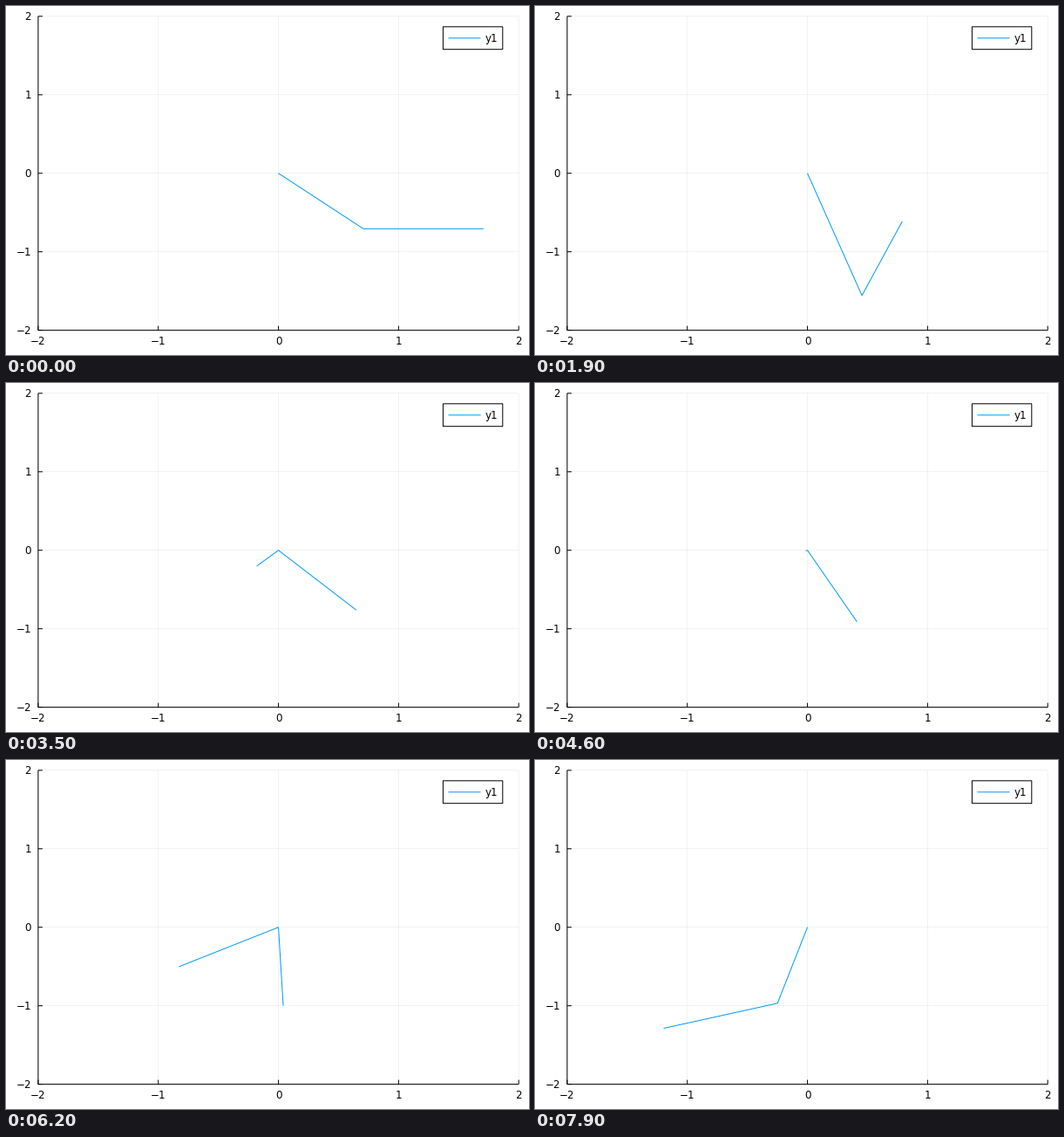
A matplotlib script that plays this animation: 600x400 px, repeating every 8000 ms.

```python
import numpy as np
import matplotlib.pyplot as plt
from matplotlib.animation import FuncAnimation
from matplotlib.patches import Rectangle

W, H, DPI = 600, 400, 100
FRAMES, STEP = 80, 100
BLUE = "#009AFA"
PT = 72 / DPI
LEFT, RIGHT, TOP, BOTTOM = 36.9, 588.19, 11.81, 371.61

# Key poses of the two arms, as angles from the downward vertical
TIMES = np.array([0, 0.7, 1.9, 2.7, 3.5, 4.6, 5.4, 6.2, 7.9])
UPPER = [np.pi / 4, 0.877, 0.908, 0.841, 0.705, 0.425, 0.217, 0.04, -0.252]
LOWER = [np.pi / 2, 0.869, -0.341, -1.225, -2.165, -2.7, -2.415, -2.091, -1.246]


def smooth(keys, t):
    """Cubic Hermite curve through the key angles."""
    keys = np.asarray(keys)
    slope = np.gradient(keys, TIMES, edge_order=2)
    i = np.clip(np.searchsorted(TIMES, t, side="right") - 1, 0, len(TIMES) - 2)
    h = TIMES[i + 1] - TIMES[i]
    s = (t - TIMES[i]) / h
    ease = s * s * (3 - 2 * s)
    return (keys[i] + (keys[i + 1] - keys[i]) * ease
            + h * s * (1 - s) * (slope[i] * (1 - s) - slope[i + 1] * s))


def to_px(x, y):
    return (LEFT + (x + 2) * (RIGHT - LEFT) / 4,
            TOP + (2 - y) * (BOTTOM - TOP) / 4)


def arm(t):
    """Pivot, joint and tip, joined in order of x."""
    th = np.array([smooth(UPPER, t), smooth(LOWER, t)])
    x = np.append(0, np.cumsum(np.sin(th)))
    y = np.append(0, -np.cumsum(np.cos(th)))
    order = np.argsort(x, kind="stable")
    return to_px(x[order], y[order])


fig = plt.figure(figsize=(W / DPI, H / DPI), dpi=DPI, facecolor="white")
ax = fig.add_axes([0, 0, 1, 1])
ax.set_xlim(0, W)
ax.set_ylim(H, 0)
ax.axis("off")


def stroke(xs, ys, color="black", width=1, z=2, **kw):
    return ax.plot(xs, ys, color=color, lw=width * PT, zorder=z, snap=False,
                   solid_capstyle="butt", solid_joinstyle="round", **kw)[0]


def label(x, y, text, ha):
    ax.text(x, y, text, ha=ha, va="baseline", fontsize=11.85 * PT,
            family="DejaVu Sans", color="black", zorder=5)


for v in range(-2, 3):
    x, y = to_px(v, v)
    text = str(v).replace("-", "\u2212")
    stroke([x, x], [TOP, BOTTOM], width=0.5, alpha=0.1, z=1)
    stroke([LEFT, RIGHT], [y, y], width=0.5, alpha=0.1, z=1)
    stroke([x, x], [BOTTOM, BOTTOM - 5])
    stroke([LEFT, LEFT + 5], [y, y])
    label(x, 387.7, text, "center")
    label(28.9, y + 4.3, text, "right")

stroke([LEFT, RIGHT], [BOTTOM, BOTTOM])
stroke([LEFT, LEFT], [TOP, BOTTOM])

line = stroke(*arm(0), color=BLUE, z=3)

ax.add_patch(Rectangle((501.4, 23.8), 68.4, 25.9, facecolor="white",
                       edgecolor="black", lw=PT, zorder=4, snap=False))
stroke([507.5, 544.6], [36.76, 36.76], color=BLUE, z=5)
label(550, 41.1, "y1", "left")


def update(i):
    line.set_data(*arm(i * STEP / 1000))
    return (line,)


anim = FuncAnimation(fig, update, frames=FRAMES, interval=STEP,
                     repeat=True, repeat_delay=0)
plt.show()
```
